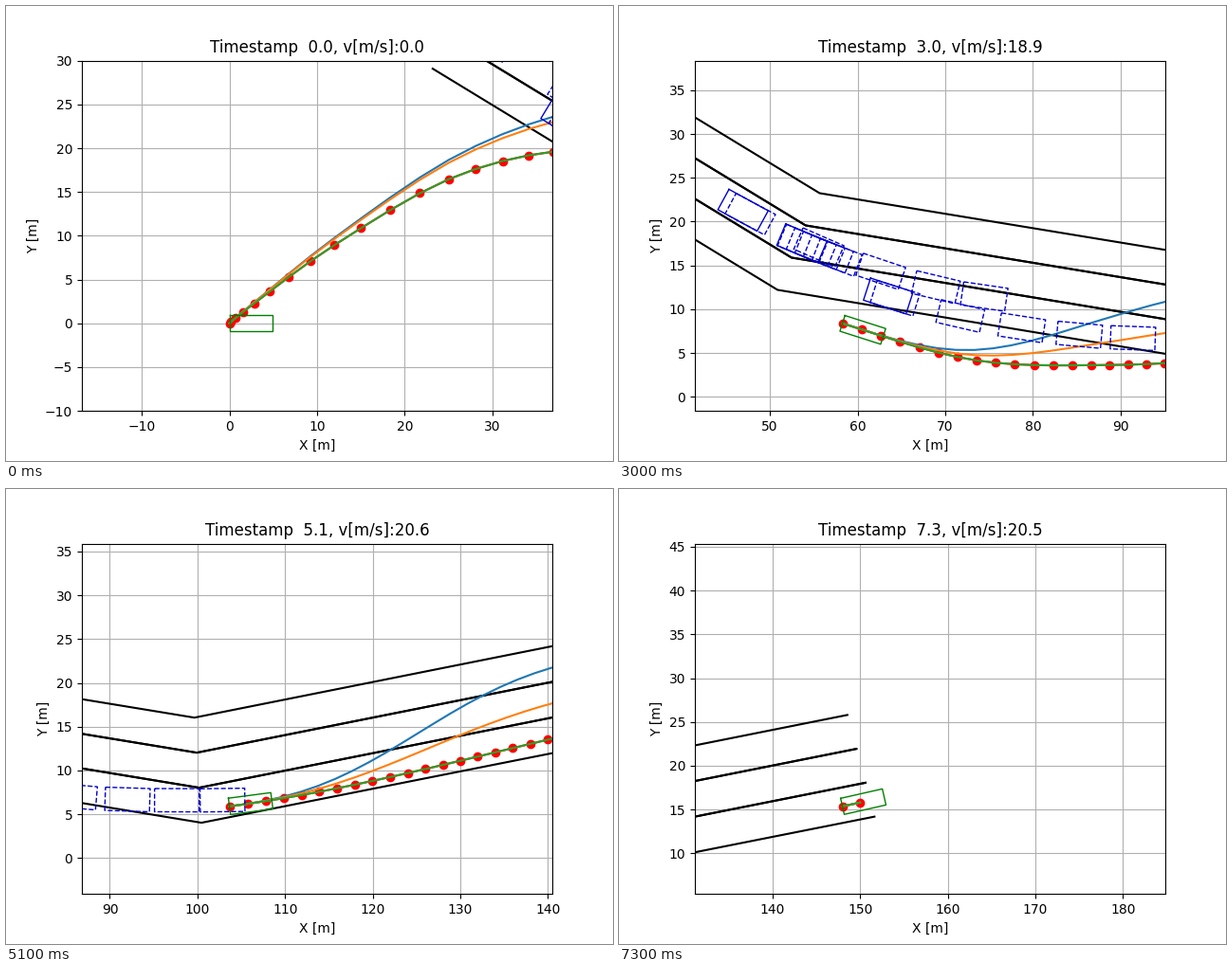
Recreate the animation shown at these times as a matplotlib script. Size 640x480 px, loop 7400 ms.

```python
import numpy as np
import matplotlib.pyplot as plt
from matplotlib.animation import FuncAnimation

FRAMES, STEP = 74, 0.1
HORIZON = 21
HALF_W, HALF_H = 26.84, 20
BLUE = "mediumblue"


def spline(*knots):
    """Cubic Hermite path through (t, x, y) knots, starting at rest."""
    data = np.array(knots, float)
    ts, pts = data[:, 0], data[:, 1:]
    slopes = np.gradient(pts, ts, axis=0)
    slopes[0] = 0

    def at(t):
        t = np.atleast_1d(t)
        i = np.clip(np.searchsorted(ts, t, side="right") - 1, 0, len(ts) - 2)
        h = (ts[i + 1] - ts[i])[:, None]
        u = (t - ts[i])[:, None] / h
        return ((1 + 2 * u) * (1 - u) ** 2 * pts[i]
                + u * (1 - u) ** 2 * h * slopes[i]
                + u * u * (3 - 2 * u) * pts[i + 1]
                + u * u * (u - 1) * h * slopes[i + 1])
    return at


def braking_car(x0, v, brake, y_end, drop, span):
    """Car that slows down evenly while its road flattens out."""
    def at(t):
        fall = abs(1 - t / span) ** 2.8
        return np.array([x0 + v * t - brake * t * t, y_end + drop * fall])
    return at


ego = spline((0, 0, 0), (0.8, 7.5, 5.25), (1.1, 13.83, 8.88),
             (1.5, 24.2, 12.8), (1.9, 34.1, 14.1), (2.3, 43.16, 13.14),
             (2.9, 56.1, 9.05), (3.7, 73.65, 4.33), (4.4, 89.0, 4.33),
             (5.1, 103.65, 5.9), (7.4, 150, 15.8))
first_plan = spline((0, 0, 0), (4, 2.85, 2.3), (8, 12, 8.95),
                    (12, 25, 16.45), (16, 36.95, 19.6), (20, 47, 19))
cars = [braking_car(18.6, 10.6, 0.385, 10.8, 30.4, 9.5),
        braking_car(50.7, 0.98, 0, 3.3, 15.5, 100),
        braking_car(38.4, 9.03, 0.22, 6.6, 16.6, 8.5)]

# Top road edge, and the step from each edge to the next one below
ROAD = np.array([(30.6, 38.5), (55.67, 23.25), (99.65, 16.03), (148.55, 25.8)])
LANE = np.array([(-2.47, -3.14), (-1.6, -3.68), (0.27, -4), (1.03, -3.87)])

i_all = np.arange(HORIZON)
first_gap = first_plan(i_all) - ego(i_all * STEP)

fig, ax = plt.subplots(figsize=(6.4, 4.8), dpi=100)


def direction(path, t):
    dx, dy = np.ravel(path(t + 0.05) - path(t - 0.05))
    return np.arctan2(dy, dx)


def box(rear, angle, length, width, style, color):
    """Rectangle outline starting at the middle of its rear edge."""
    c, s = np.cos(angle), np.sin(angle)
    u = np.array([0, length, length, 0, 0])
    v = np.array([1, 1, -1, -1, 1]) * width / 2
    ax.plot(rear[0] + u * c - v * s, rear[1] + u * s + v * c,
            style, color=color, lw=1)


def draw_car(car, t, style):
    angle = direction(car, t)
    rear = car(t) - 2.55 * np.array([np.cos(angle), np.sin(angle)])
    box(rear, angle, 5.1, 2.65, style, BLUE)


def ego_heading(t):
    """The body follows the path with a lag that fades after the start."""
    lag = 0.1 + np.exp(-t)
    return direction(ego, max(t - lag, 0.1)) * min(1, t / 0.2)


def plan(k):
    """Planned points: the way ahead, plus what is still to be corrected."""
    t = k * STEP
    i = np.arange(min(HORIZON, FRAMES + 1 - k))
    u = i[:, None] / 15
    w0, w1, w2 = (np.interp(t, [0, 1.1, 2.3, 3.7], row)
                  for row in np.eye(4)[:3])
    return (ego(t + i * STEP) + w0 * first_gap[:len(i)]
            + w1 * u ** 3 * [0.6, -0.85] + w2 * u ** 2 * [-0.57, -1.6])


def candidates(t, n):
    """Sideways offsets of the possible paths; the chosen one comes last."""
    late = t > 2.85
    span = np.interp(t, [0, 1.1, 3.7, 5.1], [32, 24, 24, 21.5])
    reach = np.interp(t, [0, 1.1, 2.8], [8, 16, 8])
    s = np.arange(n) / span
    ease = reach * s ** 3 * (10 - 15 * s + 6 * s * s)
    if late or t < 0.55:
        shares = [1, 0.5 if late else 0.85, 0]
    else:
        shares = [1, 0] if t < 1.65 else [0]
    tilt = 0.2 if late else 0
    normal = np.array([-np.sin(tilt), np.cos(tilt)])
    return [share * ease[:, None] * normal for share in shares]


def draw(k):
    t = k * STEP
    ax.clear()
    for lane in (0, 1, 1, 2, 2, 3):
        ax.plot(*(ROAD + lane * LANE).T, "k")

    path = plan(k)
    ax.plot(*path.T, "-or")
    for offset in candidates(t, len(path)):
        ax.plot(*(path + offset).T)

    for car in cars:
        draw_car(car, t, "-")
        for ahead in range(5):
            draw_car(car, t + STEP + ahead, "--")

    x, y = ego(t)[0]
    box((x, y), ego_heading(t), 4.88, 1.88, "-", "g")

    v = np.interp(t, [0, 1.1, 2.3, 3.7, 5.1, 5.9],
                  [0, 25.8, 17.6, 20.2, 20.6, 20.5])
    ax.set_xlim(x + 10 - HALF_W, x + 10 + HALF_W)
    ax.set_ylim(y + 10 - HALF_H, y + 10 + HALF_H)
    ax.set_xlabel("X [m]")
    ax.set_ylabel("Y [m]")
    ax.set_title(f"Timestamp  {t:.1f}, v[m/s]:{v:.1f}")
    ax.grid(True)
    return []


anim = FuncAnimation(fig, draw, frames=FRAMES, interval=100,
                     init_func=lambda: draw(0), repeat=True, repeat_delay=0)
plt.show()
```
